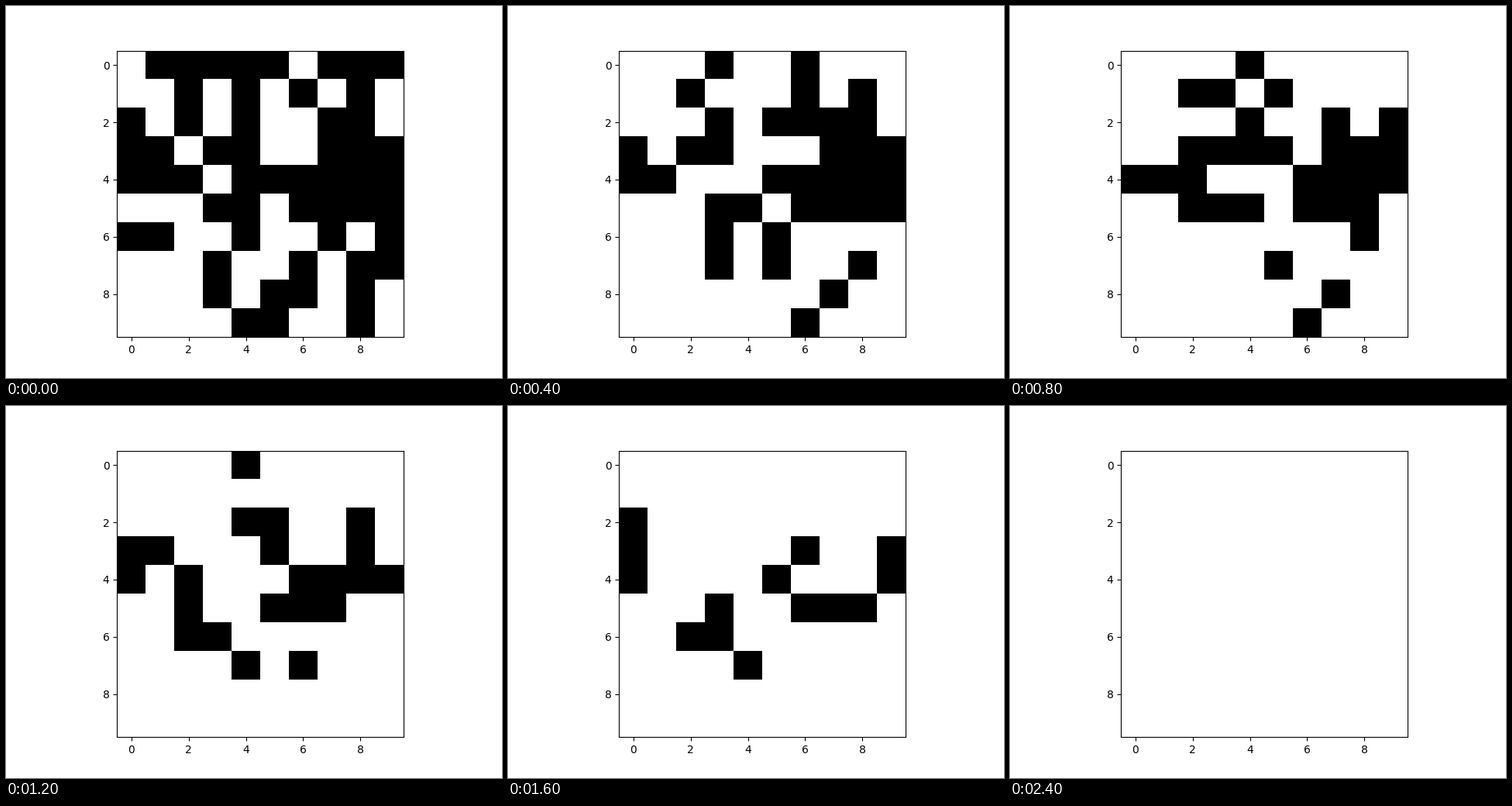
Write a matplotlib script that moves like this. It is 640 px wide and 480 px high and loops after 8000 ms.

```python
import numpy as np
import matplotlib.pyplot as plt
from matplotlib.animation import FuncAnimation

STEP_MS = 200
STEPS = 40

# One number per row, most significant bit at the left.
START_ROWS = [
    0b0111110111,
    0b0010101010,
    0b1010100110,
    0b1101100111,
    0b1110111111,
    0b0001101111,
    0b1100100101,
    0b0001001011,
    0b0001011010,
    0b0000110010,
]


def unpack(rows, width=10):
    shifts = np.arange(width)[::-1]
    return (np.array(rows)[:, None] >> shifts) & 1


def count_neighbours(grid):
    """Live cells around each cell; the edges wrap."""
    return sum(
        np.roll(grid, (dy, dx), axis=(0, 1))
        for dy in (-1, 0, 1)
        for dx in (-1, 0, 1)
        if dy or dx
    )


def evolve(grid):
    """Three neighbours give life; crowded live cells (five or more) persist."""
    n = count_neighbours(grid)
    return ((n == 3) | ((grid == 1) & (n > 4))).astype(int)


history = [unpack(START_ROWS)]
for _ in range(STEPS - 1):
    history.append(evolve(history[-1]))

fig, ax = plt.subplots(figsize=(6.4, 4.8), dpi=100)
image = ax.imshow(history[0], cmap="binary", vmin=0, vmax=1,
                  interpolation="nearest")


def update(step):
    image.set_data(history[step])
    return (image,)


anim = FuncAnimation(fig, update, frames=STEPS, interval=STEP_MS,
                     init_func=lambda: update(0), repeat=True,
                     repeat_delay=0, blit=False)
plt.show()
```
